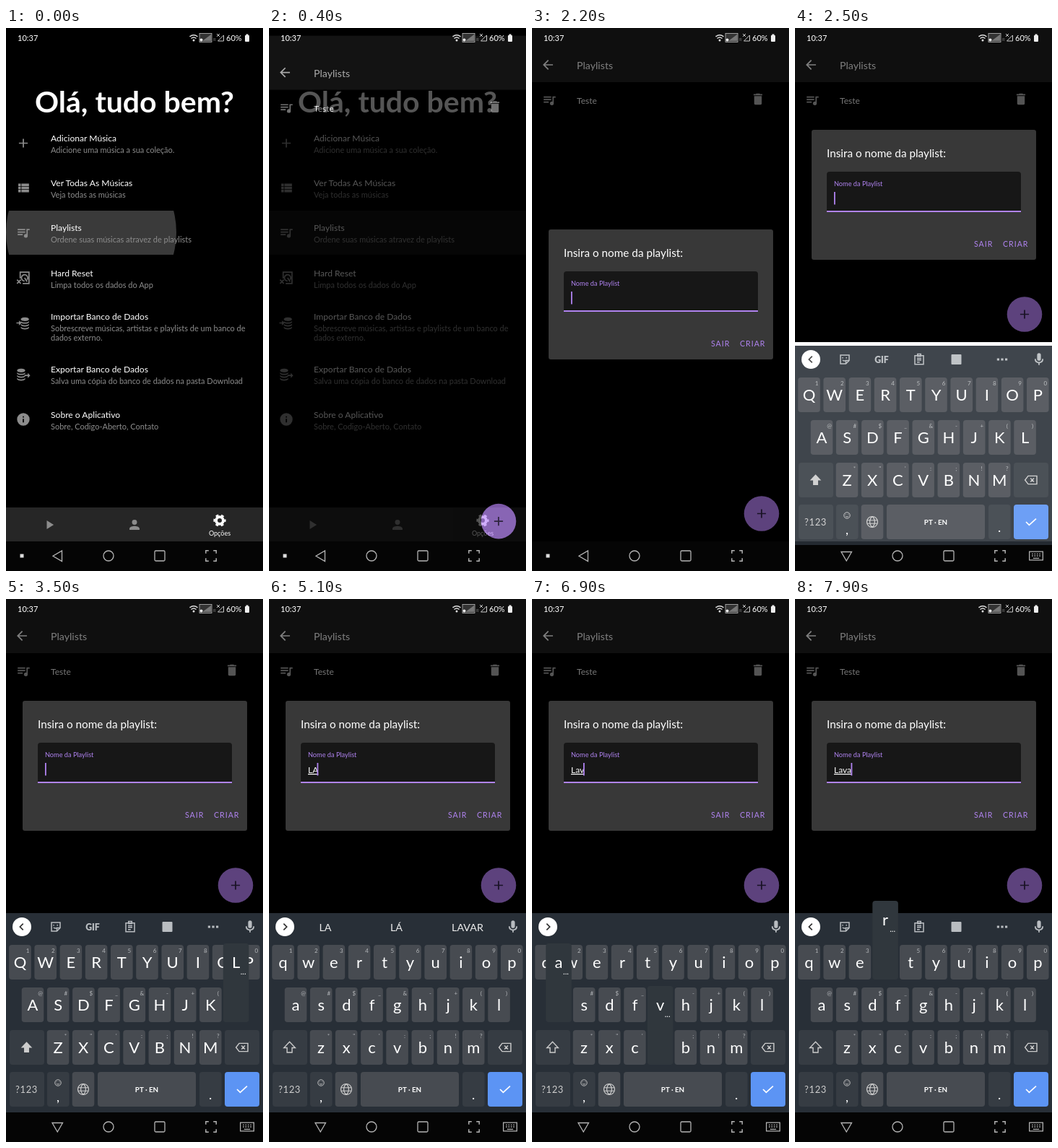
Write an HTML page that moves like this. It is 356 px wide and 752 px high and loops after 8000 ms.

```html
<!DOCTYPE html>
<html lang="pt">
<head>
<meta charset="utf-8">
<style>
html, body { margin: 0; height: 100%; overflow: hidden; background: #000; }
svg { display: block; width: 100vw; height: 100vh; font-family: Lato, "Open Sans", sans-serif; }
</style>
</head>
<body>
<svg id="stage" viewBox="0 0 356 752"></svg>
<script>
const LOOP = 8000, STEP = 100;
const GREY = '#8c8c8c', PURPLE = '#b083f0', NAV = 711, KEYS_TOP = 435;
const FOCUS = 1900, RESIZE = 2300;

const DISKS = 'M8 6c0-4 13-4 13 0s-13 4-13 0zm0 3c2 3 11 3 13 0v2c-2 3-11 3-13 0zm0 4.500c2 3 11 3 13 0v2c-2 3-11 3-13 0zm0 4.500c2 3 11 3 13 0v2c-2 3-11 3-13 0z';
const SOLID = {
  add: 'M19 13h-6v6h-2v-6H5v-2h6V5h2v6h6v2z',
  list: 'M4 14h4v-4H4zm0 5h4v-4H4zM4 9h4V5H4zm5 5h12v-4H9zm0 5h12v-4H9zM9 5v4h12V5z',
  queue: 'M15 6H3v2h12zm0 4H3v2h12zM3 16h8v-2H3zM17 6v8.2a3 3 0 1 0 2 2.8V8h3V6z',
  info: 'M12 2a10 10 0 1 0 0 20 10 10 0 0 0 0-20zm1 15h-2v-6h2zm0-8h-2V7h2z',
  play: 'M8 5v14l11-7z',
  person: 'M12 12a4 4 0 1 0 0-8 4 4 0 0 0 0 8zm0 2c-2.7 0-8 1.3-8 4v2h16v-2c0-2.7-5.3-4-8-4z',
  trash: 'M6 19c0 1.1.9 2 2 2h8c1.1 0 2-.9 2-2V7H6zM19 4h-3.5l-1-1h-5l-1 1H5v2h14z',
  back: 'M20 11H7.8l5.6-5.6L12 4l-8 8 8 8 1.4-1.4L7.8 13H20z',
  mic: 'M12 14a3 3 0 0 0 3-3V5a3 3 0 0 0-6 0v6a3 3 0 0 0 3 3zm5-3a5 5 0 0 1-10 0H5a7 7 0 0 0 6 6.9V21h2v-3.1a7 7 0 0 0 6-6.9z',
  shift: 'M12 3L3 12.5h5V20h8v-7.5h5z',
  dots: 'M3 10h4v4H3zm7 0h4v4h-4zm7 0h4v4h-4z',
  dbIn: DISKS + 'M1 11h4V8l4 4-4 4v-3H1z',
  dbOut: DISKS.replace('M8', 'M2') + 'M14 13h5v-3l4 4-4 4v-3h-5z'
};
const LINE = {
  reset: 'M7 13V3h14v18H11M18 15a5 5 0 1 0-4 2M14 12l4 6M2 15l6 6m0-6l-6 6',
  shift: SOLID.shift,
  erase: 'M7 5h15v14H7l-5.5-7zM11 9l6 6m0-6l-6 6',
  globe: 'M12 2a10 10 0 1 0 0 20 10 10 0 0 0 0-20zc-6 5-6 15 0 20 6-5 6-15 0-20M3 9h18M3 15h18',
  smile: 'M12 2a10 10 0 1 0 0 20 10 10 0 0 0 0-20zM7 14c2 4 8 4 10 0M8 8v2m8-2v2',
  sticker: 'M4 4h16v10l-6 6H4zM20 14h-6v6M8 8v2m7-2v2M8 13c1 2 4 2 5 1',
  clip: 'M4 5h16v16H4zM9 2h6v4H9zM8 10h8m-8 3h8m-8 4h5',
  left: 'M14 7l-5 5 5 5',
  right: 'M10 7l5 5-5 5',
  check: 'M4 12l5 5L20 7',
  corners: 'M3 8V3h5m8 0h5v5m0 8v5h-5m-8 0H3v-5',
  keyboard: 'M1 5h22v14H1zM5 9h2m2 0h2m2 0h2m2 0h2M5 12h2m2 0h2m2 0h2m2 0h2M7 16h10'
};

const MENU = [
  [157, 'add', 'Adicionar Música', 'Adicione uma música a sua coleção.'],
  [219, 'list', 'Ver Todas As Músicas', 'Veja todas as músicas'],
  [281, 'queue', 'Playlists', 'Ordene suas músicas atravez de playlists'],
  [343.5, 'reset', 'Hard Reset', 'Limpa todos os dados do App'],
  [403.5, 'dbIn', 'Importar Banco de Dados', 'Sobrescreve músicas, artistas e playlists de um banco de', 'dados externo.'],
  [477, 'dbOut', 'Exportar Banco de Dados', 'Salva uma cópia do banco de dados na pasta Download'],
  [539.5, 'info', 'Sobre o Aplicativo', 'Sobre, Codigo-Aberto, Contato']
];
// letters, hints, first key centre, top
const ROWS = [
  ['qwertyuiop', '1234567890', 19.5, 479],
  ['asdfghjkl', '@#$_&-+()', 37, 538],
  ['zxcvbnm', '*"\':;!?', 72, 597]
];
const PITCH = 35.2;
// start, text, caret x
const TYPED = [[0, '', 54], [3600, 'L', 60], [3800, 'LA', 66.5], [5600, 'L', 60],
  [6500, 'La', 66], [6800, 'Lav', 71], [7000, 'Lava', 77.5]];
const PRESSES = [['l', 3400, 3600], ['a', 3700, 3800], ['a', 6400, 6500],
  ['v', 6700, 7000], ['a', 6900, 7100], ['r', 7900, 8000]];
const BLINKS = [[3000, 3500], [4300, 4800], [6200, 6500]];

const within = (t, a, b) => t >= a && t < b;
const ramp = (t, a, b) => Math.min(1, Math.max(0, (t - a) / (b - a)));
const easeOut = (k, power = 2) => 1 - (1 - k) ** power;
const mix = (a, b, k) => a + (b - a) * k;
const safe = s => s.replace(/&/g, '&amp;');

const rect = (x, y, w, h, fill, r = 0, more = '') =>
  `<rect x="${x}" y="${y}" width="${w}" height="${h}" rx="${r}" fill="${fill}" ${more}/>`;
const circle = (x, y, r, fill, more = '') => `<circle cx="${x}" cy="${y}" r="${r}" fill="${fill}" ${more}/>`;
const text = (x, y, size, str, fill = '#fff', more = '') =>
  `<text x="${x}" y="${y}" font-size="${size}" fill="${fill}" ${more}>${safe(str)}</text>`;
const label = (x, y, size, str, fill = '#fff', more = '') =>
  text(x, y, size, str, fill, 'text-anchor="middle" ' + more);
const path = (d, fill, more = '') => `<path d="${d}" fill="${fill}" ${more}/>`;
const stroke = (d, color, w = 1.3) => path(d, 'none', `stroke="${color}" stroke-width="${w}"`);
const group = (dy, alpha, body) => `<g transform="translate(0 ${dy})" opacity="${alpha}">${body}</g>`;
const place = (x, y, s) => `transform="translate(${x} ${y}) scale(${s}) translate(-12 -12)"`;
const icon = (name, x, y, color = GREY, s = .87) => path(SOLID[name], color, place(x, y, s));
const outline = (name, x, y, color = GREY, s = .87, w = 2) =>
  path(LINE[name], 'none', `stroke="${color}" stroke-width="${w}" ${place(x, y, s)}`);

function statusBar() {
  return text(16, 18, 11, '10:37') +
    stroke('M254.500 12q5.500-4.500 11 0M256.500 14.500q3.500-3 7 0', '#ddd', 1.5) + circle(260, 17, 1.5, '#ddd') +
    rect(268, 7.5, 17, 12, '#333', 0, 'stroke="#bbb" stroke-width=".8"') +
    path('M272 18l12-9v9z', '#777') + circle(270.5, 16.5, 2, '#eee') +
    label(289, 18, 6, 'R', '#777') +
    stroke('M292 8l4 4m0-4l-4 4M293.500 18l8-8v8z', '#ccc', 1) +
    text(305, 18, 11, '60%') +
    rect(331, 10, 6, 9, '#eee', 1) + rect(332.5, 8.5, 3, 2, '#eee');
}

function navBar(typing) {
  const c = '#b5b5b5';
  return (typing ? stroke('M64 725.500h14.500l-7.250 12.500z', c) + outline('keyboard', 334, 731, c, .85, 1.5)
    : rect(19.5, 728.5, 5, 5, '#ddd') + stroke('M77.500 724v14.500l-12.500-7.250z', c)) +
    circle(142, 731, 7, 'none', `stroke="${c}" stroke-width="1.3"`) +
    rect(206, 724, 14, 14, 'none', 1.5, `stroke="${c}" stroke-width="1.3"`) +
    outline('corners', 284, 731, c, .8, 1.8);
}

function menu(t) {
  const ripple = circle(118, 283, 118 + t * 1.2, '#3a3a3a',
    `clip-path="url(#row)" opacity="${1 - ramp(t, 200, 500)}"`);
  const rows = MENU.map(([y, ic, title, ...subs]) =>
    (SOLID[ic] ? icon : outline)(ic, 24, y + (subs[1] ? 5 : 2.5)) + text(62, y, 12.1, title) +
    subs.map((s, i) => text(62, y + 16.3 + i * 13, 11, s, GREY)).join('')).join('');
  const gear = circle(296, 682, 4.9, 'none', 'stroke="#fff" stroke-width="3.8"') +
    circle(296, 682, 7.4, 'none', 'stroke="#fff" stroke-width="2.4" stroke-dasharray="3.9 3.85" stroke-dashoffset="1.95"');
  return '<clipPath id="row"><path d="M0 253h356v61H0z"/></clipPath>' + ripple +
    label(178, 117, 41, 'Olá, tudo bem?', '#fff', 'font-weight="700"') + rows +
    rect(0, 664, 356, 47, '#262626') + icon('play', 60, 688) + icon('person', 178, 688) +
    gear + label(296, 703, 9, 'Opções');
}

function playlists(t, bottom) {
  const y = bottom - 38.5, press = ramp(t, 1100, 1250) - ramp(t, 1300, 1600);
  return rect(0, 0, 356, bottom, '#000') + rect(0, 0, 356, 75, '#1e1e1e') +
    icon('back', 22, 51, '#fff') + text(62, 57, 14.2, 'Playlists') +
    icon('queue', 24, 100, '#aaa') + text(62, 105, 12.1, 'Teste', '#eee') + icon('trash', 313, 98.5, '#aaa') +
    circle(318, y, 24.3, '#bb86fc') + circle(318, y, 24.3, '#000', `opacity="${press * .32}"`) +
    icon('add', 318, y, '#33244a');
}

function dialog(t, y) {
  const focus = ramp(t, FOCUS, FOCUS + 200), on = t >= FOCUS;
  const [, word, caret] = TYPED.filter(s => t >= s[0]).pop();
  const lit = on && !BLINKS.some(([a, b]) => within(t, a, b));
  return rect(23, y, 311, 180, '#383838', 3) +
    text(44, y + 37.5, 15.3, 'Insira o nome da playlist:') +
    path(`M44 ${y + 113}v-51q0-4 4-4h261q4 0 4 4v51z`, on ? '#171717' : '#282828') +
    rect(44, y + 112, 269, on ? 2 : 1, on ? PURPLE : '#777') +
    text(54, mix(y + 92, y + 78, focus), mix(12.2, 9.2, focus), 'Nome da Playlist', on ? PURPLE : '#aaa') +
    text(54, y + 100, 12, word, '#fff', 'text-decoration="underline"') +
    (lit ? rect(caret, y + 86, 1.8, 17.5, PURPLE) : '') +
    text(248, y + 162, 10.6, 'SAIR', PURPLE, 'letter-spacing="1"') +
    text(288, y + 162, 10.6, 'CRIAR', PURPLE, 'letter-spacing="1"');
}

function toolbar(t) {
  const c = '#b9bdc1', tools = t < 3900 || t >= 7500;
  let out = circle(22, 454, 13, '#fff') + outline(tools ? 'left' : 'right', 22, 454, '#333') +
    icon('mic', 338, 454, c);
  if (tools) out += outline('sticker', 69, 454, c, .75) +
    label(120, 458.5, 12.3, 'GIF', c, 'font-weight="900"') + outline('clip', 172, 454, c, .75) +
    rect(216.5, 447, 14, 14, c, 1) + icon('dots', 287, 454, c, .8);
  else if (t < 5600) out += ['LA', 'LÁ', 'LAVAR'].map((s, i) => label(78 + i * 98.5, 460, 14.3, s, '#eee')).join('');
  return out;
}

function keyboard(t) {
  const caps = t < 3800, face = s => caps ? s.toUpperCase() : s;
  const dim = '#363c43', key = '#474b51';
  let keys = '', pops = '';
  for (const [letters, hints, x0, y] of ROWS) [...letters].forEach((ch, i) => {
    const x = x0 + i * PITCH;
    keys += rect(x - 15.3, y, 30.6, 48, key, 4) + label(x, y + 32, 22, face(ch)) +
      label(x + 10.5, y + 10.5, 8, hints[i], '#b5b8bb');
    if (PRESSES.some(([k, a, b]) => k === ch && within(t, a, b)))
      pops += rect(x - 17.8, y - 61, 35.6, 109, '#30373d', 4) + label(x, y - 27, 22, face(ch)) +
        label(x + 10, y - 18, 11, '...');
  });
  const wide = (x, y, fill = dim) => rect(x, y, 48, 48, fill, 4);
  const small = (x, fill = dim) => rect(x, 655, 30.6, 48, fill, 4);
  return rect(0, KEYS_TOP, 356, 276, '#282f37') + toolbar(t) + keys +
    wide(5, 597) + (caps ? icon('shift', 28.5, 621, '#ccc') : outline('shift', 28.5, 621, '#ccc', .87, 1.6)) +
    wide(303, 597) + outline('erase', 327, 621, '#ccc', .8, 1.8) +
    wide(5, 655) + label(28.5, 684, 13, '?123', '#ccc', 'letter-spacing=".6"') +
    small(57) + outline('smile', 72, 670, '#ccc', .42, 2.2) + label(72, 696, 18, ',') +
    small(91.7, key) + outline('globe', 107, 679, '#ccc', .75, 1.6) +
    rect(127, 655, 136, 48, key, 4) + label(195, 683, 9.8, 'PT · EN', '#fff', 'font-weight="700"') +
    small(268) + label(283, 693, 18, '.') +
    wide(303, 655, '#5c94f4') + outline('check', 327, 679, '#fff') + pops;
}

function scene(t) {
  const enter = easeOut(ramp(t, 300, 650), 5), show = ramp(t, 1270, 1470);
  const typing = t >= RESIZE, bottom = typing ? KEYS_TOP : NAV;
  let out = rect(0, 0, 356, 752, '#000');
  if (enter < 1) out += menu(t);
  if (enter > 0) out += group((1 - enter) * 57, enter ** 2, playlists(t, bottom));
  if (show > 0) out += rect(0, 0, 356, bottom, '#000', 0, `opacity="${show * .5}"`) +
    group(0, show, dialog(t, typing ? 141 : 279));
  out += rect(0, NAV, 356, 41, '#050505');
  if (typing) {
    const k = easeOut(ramp(t, RESIZE, RESIZE + 300));
    out += rect(0, KEYS_TOP, 356, 276, '#fff') + group((1 - k) * 45, k, keyboard(t));
  }
  return out + statusBar() + navBar(typing);
}

const stage = document.getElementById('stage');
let last = -1;
function tick() {
  const t = Math.floor(performance.now() % LOOP / STEP) * STEP;
  if (t !== last) stage.innerHTML = scene(last = t);
  requestAnimationFrame(tick);
}
tick();
</script>
</body>
</html>
```
